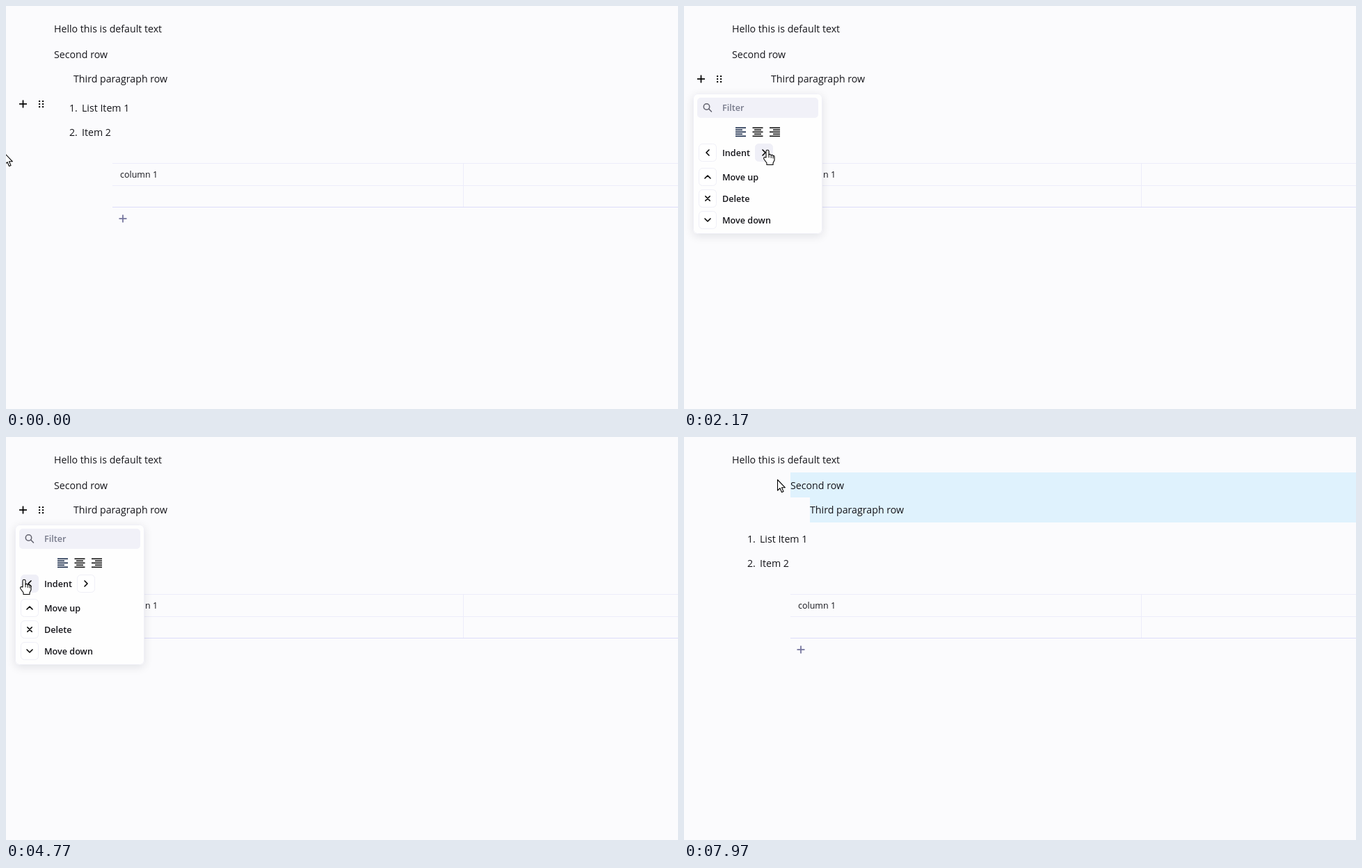
Write an HTML page with a canvas that moves like this. It is 966 by 580 pixels and loops after 8000 ms.

```html
<!DOCTYPE html>
<html lang="en">
<head>
<meta charset="utf-8">
<style>
  html, body { margin: 0; width: 100%; height: 100%; overflow: hidden; background: #fbfbfd; }
  canvas { display: block; }
</style>
</head>
<body>
<canvas id="stage" width="966" height="580"></canvas>
<script>
const ctx = document.getElementById('stage').getContext('2d');
const LOOP = 8000, INDENT = 28;
const INK = '#15151a', PAPER = '#fbfbfd', LINE = '#ececfa', HOVER = '#efeff7', SELECTED = '#dff2fd';
const FONT = '"Open Sans", "Noto Sans", sans-serif';

// Pointer stops: time, x, y
const PATH = [
  [0, -2, 212], [150, -1, 211], [750, 34, 122], [950, 47, 104], [1500, 47, 104],
  [1950, 120, 208], [3250, 121, 209], [3800, 26, 206], [4900, 26, 206],
  [5300, 190, 72], [5480, 194, 72], [5680, 225.5, 103], [5850, 225, 104],
  [6350, 101.5, 78], [6800, 101.5, 78], [7450, 118, 71], [7900, 134, 61], [8000, 134, 61]
];

const EVENTS = {
  toolbarUp: 700, open: 1080, firstIndent: 2050, close: 5400, select: 5950,
  right: [2050, 2400], left: [4050, 4450], tab: [6900, 7150, 7400]
};

const count = (times, t) => times.filter(at => t >= at).length;
const within = (p, x, y, w, h) => p.x >= x && p.x < x + w && p.y >= y && p.y < y + h;

function pointerAt(t) {
  const i = Math.max(1, PATH.findIndex(stop => stop[0] > t));
  const [t0, x0, y0] = PATH[i - 1], [t1, x1, y1] = PATH[i];
  const u = (t - t0) / (t1 - t0), k = u * u * (3 - 2 * u);
  return { x: Math.round(x0 + (x1 - x0) * k), y: Math.round(y0 + (y1 - y0) * k) };
}

function stateAt(t) {
  const e = EVENTS, tabs = count(e.tab, t);
  const menu = t >= e.open && t < e.close;
  const both = t >= e.select;
  return {
    menu, both,
    pointer: pointerAt(t),
    second: 69 + tabs * INDENT,
    third: 97 + (count(e.right, t) - count(e.left, t) + tabs) * INDENT,
    toolbarY: t < e.toolbarUp ? 141 : 105,
    thirdSelected: both || (menu && t < e.firstIndent),
    caret: t >= e.close && !both
  };
}

function rect(x, y, w, h, color) {
  ctx.fillStyle = color;
  ctx.fillRect(x, y, w, h);
}

function box(x, y, w, h, radius, fill, border) {
  ctx.beginPath();
  ctx.roundRect(x, y, w, h, radius);
  ctx.fillStyle = fill;
  ctx.fill();
  if (border) stroke(null, border, 1);
}

function stroke(path, color, width) {
  ctx.strokeStyle = color;
  ctx.lineWidth = width;
  ctx.lineCap = ctx.lineJoin = 'round';
  path ? ctx.stroke(new Path2D(path)) : ctx.stroke();
}

function text(str, x, centerY, size = 14.2, color = INK, weight = 400) {
  ctx.font = `${weight} ${size}px ${FONT}`;
  ctx.fillStyle = color;
  ctx.fillText(str, x, centerY + (size < 13 ? 4.5 : 5));
}

function at(x, y, draw) {
  ctx.save();
  ctx.translate(x, y);
  draw();
  ctx.restore();
}

function plus(x, y, color, width) {
  rect(x - 5.5, y - width / 2, 11, width, color);
  rect(x - width / 2, y - 5.5, width, 11, color);
}

function drawDocument(s) {
  if (s.both) rect(s.second, 51, 966 - s.second, 36, SELECTED);
  if (s.thirdSelected) rect(s.third, 87, 966 - s.third, 36, SELECTED);
  text('Hello this is default text', 69, 33);
  text('Second row', s.second, 70);
  text('Third paragraph row', s.third, 105);
  text('1.', 91, 147);
  text('List Item 1', 109, 147);
  text('2.', 91, 182);
  text('Item 2', 109, 182);

  rect(153, 226, 813, 1, LINE);
  rect(153, 258, 813, 1, LINE);
  rect(657, 227, 1, 62, LINE);
  rect(153, 289, 813, 1, '#dcdcfa');
  text('column 1', 164, 242, 12.5);
  plus(168, 306, '#77779f', 1.8);
  if (s.caret) rect(146, 60, 1, 19, '#000');
}

function drawToolbar(s) {
  if (s.both) return;
  const y = s.toolbarY;
  for (const x of [24, 50])
    if (within(s.pointer, x - 13, y - 13, 26, 26)) box(x - 13, y - 13, 26, 26, 6, HOVER);
  plus(24.5, y, '#000', 1.7);
  for (const x of [47, 52])
    for (const dy of [-5, -1, 3]) box(x, y + dy, 2.2, 2.2, 0.8, '#000');
}

function button(s, x, y, icon) {
  const hovered = within(s.pointer, x - 13, y - 13, 26, 26);
  box(x - 12.5, y - 12.5, 25, 25, 5, hovered ? HOVER : '#fff', hovered ? HOVER : '#efeff7');
  at(x, y, () => stroke(icon, '#000', 1.6));
}

function alignIcon(x, shift, color) {
  for (let i = 0; i < 5; i++) {
    const w = i % 2 ? 10 : 15;
    rect(x + (15 - w) * shift, 174.5 + i * 3, w, 1.6, color);
  }
}

function drawMenu(s) {
  ctx.save();
  ctx.shadowColor = 'rgba(13,20,33,.11)';
  ctx.shadowBlur = 13;
  ctx.shadowOffsetY = 3;
  box(13, 126, 186, 202, 6, '#fefefe');
  ctx.restore();
  box(13.5, 126.5, 185, 201, 6, '#fefefe', '#f0f0f7');

  box(19, 132, 174, 29, 5, '#f1f1f8');
  ctx.beginPath();
  ctx.arc(32.5, 145, 4.2, 0, 7);
  stroke(null, '#62626e', 1.5);
  stroke('M35.8 148.2L39.5 152', '#62626e', 1.5);
  text('Filter', 55, 146.5, 12.6, '#777a8b', 600);

  alignIcon(74, 0, '#152746');
  alignIcon(98.5, 0.5, '#111');
  alignIcon(123, 1, '#111');

  button(s, 34, 211, 'M2 -4L-2 0L2 4');
  button(s, 115, 211, 'M-2 -4L2 0L-2 4');
  button(s, 34, 246, 'M-4 2L0 -2L4 2');
  button(s, 34, 277, 'M-3.2 -3.2L3.2 3.2M3.2 -3.2L-3.2 3.2');
  button(s, 34, 308, 'M-4 -2L0 2L4 -2');
  text('Indent', 55, 211, 12.6, INK, 600);
  text('Move up', 55, 246, 12.6, INK, 600);
  text('Delete', 55, 277, 12.6, INK, 600);
  text('Move down', 55, 308, 12.6, INK, 600);
}

const ARROW = 'M.5 .5V16L4 12.7L6.5 18.5L9 17.4L6.5 11.8H11.4Z';
const HAND = 'M-2 10V1Q-2 -.8 0 -.8T2 1V6Q4 4.5 5.2 6.7Q7 5.5 8 7.5Q10 6.7 10 9.5V14L8 18V20.5H-1V18L-5 12.5Q-6 9.7 -4 9.5Z';
const HAND_FOLDS = 'M2 6V10M5.2 7V10.5M8 8V11';
const BEAM = 'M-3 -7.5H-1L0 -6.5L1 -7.5H3M0 -6.5V6.5M-3 7.5H-1L0 6.5L1 7.5H3';

function pointerKind(s) {
  const p = s.pointer;
  if (s.menu && within(p, 13, 126, 186, 202)) return 'hand';
  if (!s.both && within(p, 37, s.toolbarY - 13, 26, 26)) return 'hand';
  const left = p.y < 51 ? 69 : p.y < 87 ? s.second : p.y < 123 ? s.third : 109;
  return p.x >= left && p.y > 16 && p.y < 200 ? 'beam' : 'arrow';
}

function drawPointer(s) {
  const kind = pointerKind(s);
  at(s.pointer.x, s.pointer.y, () => {
    if (kind === 'beam') return stroke(BEAM, '#111', 1.1);
    const shape = kind === 'hand' ? HAND : ARROW;
    ctx.fillStyle = '#fff';
    ctx.fill(new Path2D(shape));
    stroke(shape, '#000', 1.1);
    if (kind === 'hand') stroke(HAND_FOLDS, '#000', 1);
  });
}

function frame(now) {
  const s = stateAt(now % LOOP);
  rect(0, 0, 966, 580, PAPER);
  drawDocument(s);
  drawToolbar(s);
  if (s.menu) drawMenu(s);
  drawPointer(s);
  requestAnimationFrame(frame);
}
requestAnimationFrame(frame);
</script>
</body>
</html>
```
